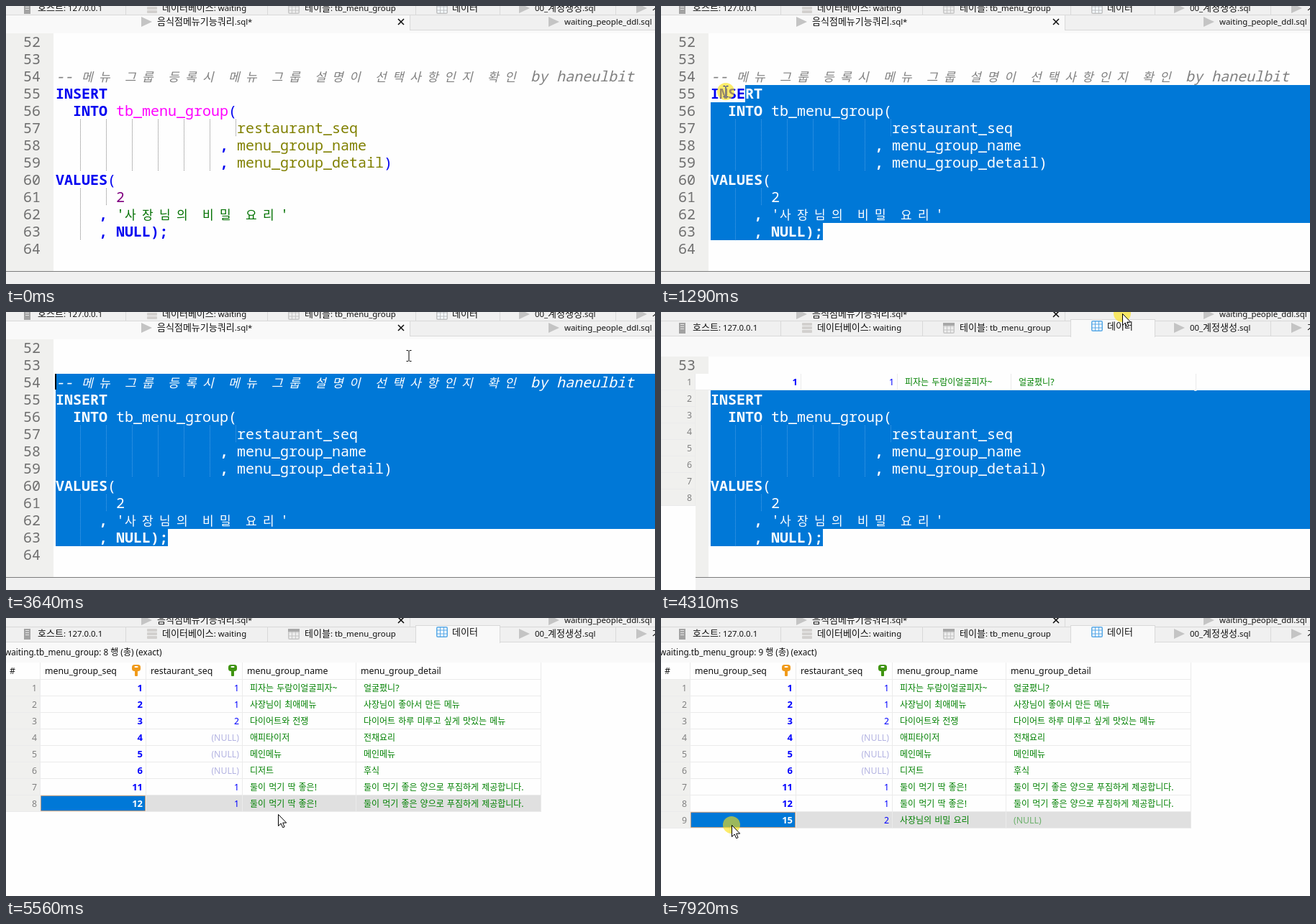
These frames come from a looping animation (902x387 px, 7990 ms). An HTML page:

```html
<!DOCTYPE html>
<html lang="ko">
<head>
<meta charset="utf-8">
<title>SQL editor</title>
<style>
  html, body { margin: 0; width: 100%; height: 100%; overflow: hidden; background: #f0f0f0; }
  svg { display: block; width: 902px; height: 387px; font-family: 'Noto Sans', 'Noto Sans CJK KR', 'Noto Sans CJK JP', sans-serif; }
  .ko { font-family: 'Noto Sans CJK KR', 'Noto Sans CJK JP', 'Noto Sans CJK', sans-serif; }
  .code { font: 20px 'Noto Sans Mono', 'DejaVu Sans Mono', monospace; }
  .code .ko { font-size: 17px; letter-spacing: 8.36px; }
  .tabs { font-size: 11.4px; }
  .tabs .ko { font-size: 13px; }
  .grid { font-size: 12.3px; }
  .grid .ko { font-size: 12px; }
  .grid .bold { font-size: 13px; }
  .cell { word-spacing: .9px; }
  .end { text-anchor: end; }
  .bold, .key, .sep { font-weight: 700; }
  .key, .sep, .sym { fill: #0000f0; }
  .table { fill: #f0f; }
  .field { fill: #808000; }
  .num { fill: #800080; }
  .str { fill: #007000; }
  .note { fill: #808080; font-style: italic; }
  .guide { stroke: #808080; stroke-dasharray: 1 1; }
  .sel text { fill: #fff; }
  .sel .guide { stroke: #4a9ee6; }
</style>
</head>
<body>
<svg id="stage" viewBox="0 0 902 387" xmlns="http://www.w3.org/2000/svg"></svg>
<script>
const DURATION = 7990, LEFT = 69, COL = 12, LINE = 24, ASCENT = 19;
const lineTop = n => 38 + LINE * (n - 52);

const rect = (x, y, w, h, fill, more = '') => `<rect x="${x}" y="${y}" width="${w}" height="${h}" fill="${fill}" ${more}/>`;
const hline = (x, y, w, c = '#d9d9d9') => rect(x, y, w, 1, c);
const vline = (x, y, h, c = '#d9d9d9') => rect(x, y, 1, h, c);
const hangul = s => s.replace(/[가-힣]+/g, m => `<tspan class="ko">${m}</tspan>`);
const text = (x, y, s, cls = '', fill = '#111') => `<text x="${x}" y="${y}" class="${cls}" fill="${fill}">${hangul(s)}</text>`;
const group = (id, cls, body) => `<g id="${id}" class="${cls}">${body}</g>`;

// Code editor: [line, column, style, text]
const CODE = [
  [54, 0, 'note', '-- 메뉴 그룹 등록시 메뉴 그룹 설명이 선택사항인지 확인 by haneulbit'],
  [55, 0, 'key', 'INSERT'],
  [56, 2, 'key', 'INTO'], [56, 7, 'table', 'tb_menu_group'], [56, 20, 'sym', '('],
  [57, 21, 'field', 'restaurant_seq'],
  [58, 19, 'sep', ','], [58, 21, 'field', 'menu_group_name'],
  [59, 19, 'sep', ','], [59, 21, 'field', 'menu_group_detail'], [59, 38, 'sym', ')'],
  [60, 0, 'key', 'VALUES'], [60, 6, 'sym', '('],
  [61, 7, 'num', '2'],
  [62, 5, 'sep', ','], [62, 7, 'str', "'사장님의 비밀 요리'"],
  [63, 5, 'sep', ','], [63, 7, 'key', 'NULL'], [63, 11, 'sep', ');']
];
const columns = s => [...s].reduce((n, c) => n + (/[가-힣]/.test(c) ? 2 : 1), 0);

function codeRun([line, col, cls, s]) {
  let out = '';
  for (const m of s.matchAll(/[가-힣]+|[^\s가-힣]+/g))
    out += text(LEFT + COL * (col + columns(s.slice(0, m.index))), lineTop(line) + ASCENT, m[0], cls, '');
  return out;
}
function guide(i, from, to) {
  const x = 67.5 + 36 * i;
  return `<path class="guide" d="M${x} ${lineTop(from)}V${lineTop(to + 1) - 1}"/>`;
}
const guides = [1, 2, 3, 4, 5, 6].map(i => guide(i, 57, 59)).join('')
  + guide(7, 57, 57) + guide(1, 61, 63) + guide(2, 61, 61);
const codeText = guides + CODE.map(codeRun).join('');

function editor() {
  let s = rect(0, 38, 902, 331, '#fefefe') + rect(0, 38, 66, 331, '#f0f0ee');
  for (let n = 52; n <= 64; n++) s += text(24, lineTop(n) + ASCENT, '' + n, '', '#707070');
  s += codeText + `<g class="sel" clip-path="url(#range)">${rect(0, 38, 902, 331, '#0078d7')}${codeText}</g>`;
  return s + rect(0, 369, 902, 18, '#f0f0f0') + hline(0, 369, 902, '#7c7c7c') + rect(68, 86, 2, 22, '#000', 'id="caret"');
}

// Tab rows
const play = x => `<path d="M${x} 15L${x + 15} 22L${x} 29Z" fill="#c4c4c4"/>`;
const server = rect(25, 15, 9, 15, '#a2a2a2') + [17, 20, 23].map(y => hline(27, y, 5, '#e4e4e4')).join('');
const database = [15, 20, 25].map(y => rect(196, y, 14, 4, '#d2d0ce', 'rx="1"')).join('');
const sheet = (x, y, c, bg) => rect(x + .75, y + .75, 14.5, 13.5, bg, `rx="1.5" stroke="${c}" stroke-width="1.5"`)
  + [5, 10].map(d => vline(x + d, y + 1, 13, c) + hline(x + 1, y + d - .5, 14, c)).join('');

function hostTabs(active) {
  let s = [166, 363, 569, 686, 847].map(x => vline(x, 13, 20)).join('') + server + database
    + sheet(392, 15, '#c6c6c6', '#eee') + rect(392, 15, 16, 4, '#a8a8a8')
    + text(44, 26, '호스트: 127.0.0.1') + text(217, 26, '데이터베이스: waiting')
    + text(415, 26, '테이블: tb_menu_group') + play(713) + text(735, 26, '00_계정생성.sql')
    + play(876) + text(898, 26, '가');
  if (active) s += rect(569.5, 10.5, 117, 24, '#f9f9f9', 'stroke="#d9d9d9"') + rect(570, 33, 116, 3, '#f9f9f9');
  return s + sheet(598, active ? 12 : 15, active ? '#5aa9e6' : '#c0c0c0', '#f4faff')
    + text(620, active ? 24 : 26, '데이터');
}
function fileTabs(active) {
  const tab = active ? rect(0, 13, 561, 22, '#f9f9f9') : '';
  return tab + vline(561, 13, 20) + play(188) + text(210, 26, '음식점메뉴기능쿼리.sql*')
    + '<path d="M545 18L553 26M553 18L545 26" stroke="#111" stroke-width="1.6"/>'
    + play(754) + text(776, 26, 'waiting_people_ddl.sql');
}
function tabRows(back, front) {
  return rect(0, 0, 902, 38, '#f0f0f0') + `<g transform="translate(0 -19)">${back}</g>`
    + rect(0, 12, 902, 21, '#f0f0f0') + hline(0, 12, 902)
    + rect(0, 33, 902, 5, '#f9f9f9') + hline(0, 33, 902) + front;
}

// Data grid
const PAIR = ['둘이 먹기 딱 좋은!', '둘이 먹기 좋은 양으로 푸짐하게 제공합니다.'];
const ROWS = [
  [1, 1, '피자는 두람이얼굴피자~', '얼굴폈니?'],
  [2, 1, '사장님이 최애메뉴', '사장님이 좋아서 만든 메뉴'],
  [3, 2, '다이어트와 전쟁', '다이어트 하루 미루고 싶게 맛있는 메뉴'],
  [4, null, '애피타이저', '전채요리'],
  [5, null, '메인메뉴', '메인메뉴'],
  [6, null, '디저트', '후식'],
  [11, 1, ...PAIR],
  [12, 1, ...PAIR],
  [15, 2, '사장님의 비밀 요리', null]
];
const HEAD = ['menu_group_seq', 'restaurant_seq', 'menu_group_name', 'menu_group_detail'];
const keyIcon = (x, c) => rect(x - 6, 65, 12, 9, c, 'rx="3.5"') + rect(x - 2, 73, 4, 8, c, 'rx="1"') + rect(x - 2.5, 67, 5, 2, '#fff', 'rx="1"');

function grid(count, w, selected) {
  const edges = [0, 147, 281, 439, 696].map(d => d + w), right = edges[4], bottom = 86 + 23 * count;
  let s = rect(0, 34, 902, 353, '#fefefe') + rect(0, 34, 902, 28, '#f9f9f9')
    + `<g class="status" font-size="11.75">${text(-2, 52, `waiting.tb_menu_group: ${count} 행 (총) (exact)`)}</g>`
    + rect(0, 86, w, bottom - 87, '#f0f0ee') + text(5, 78, '#');
  HEAD.forEach((h, i) => s += text(edges[i] + 7, 78, h));
  s += keyIcon(edges[1] - 13, '#f09a1a') + keyIcon(edges[2] - 13, '#3f9410');
  const top = 86 + 23 * (selected - 1);
  s += rect(edges[1], top, right - edges[1], 22, '#e0e0e0');
  for (let i = 0; i <= count; i++) s += hline(0, 85 + 23 * i, right, '#ebebeb');
  for (const x of edges) s += vline(x, 62, bottom - 62, '#ebebeb');
  s += rect(w + 1.5, top + .5, 145, 21, '#0078d7', 'stroke="#ff8728" stroke-dasharray="1 1"');
  ROWS.slice(0, count).forEach(([seq, shop, name, detail], i) => {
    const y = 102 + 23 * i;
    s += text(w - 4, y, '' + (i + 1), 'end', '#808080')
      + text(edges[1] - 4, y, '' + seq, 'end bold', i + 1 === selected ? '#fff' : '#00f')
      + text(edges[2] - 4, y, shop ? '' + shop : '(NULL)', 'end', shop ? '#00f' : '#b4b4e2')
      + text(edges[2] + 11, y, name, 'cell', '#008000')
      + text(edges[3] + 11, y, detail || '(NULL)', 'cell', detail ? '#008000' : '#6cb06c');
  });
  return s;
}

document.getElementById('stage').innerHTML =
  `<defs><clipPath id="range"><polygon id="rangeShape"/></clipPath>
   <clipPath id="partial"><path d="M0 0H902V62H0ZM0 86H902V109H48V387H0Z"/></clipPath></defs>`
  + group('editor', 'code', editor())
  + group('before', 'grid', grid(8, 47, 8))
  + group('after', 'grid', grid(9, 40, 8))
  + group('picked', 'grid', grid(9, 40, 9))
  + group('fileRow', 'tabs', tabRows(hostTabs(false), fileTabs(true)))
  + group('hostRow', 'tabs', tabRows(fileTabs(false), hostTabs(true)))
  + `<circle id="halo" r="12" fill="#fbe010" fill-opacity=".62"/>
     <path id="beam" d="M-3.5 -7.5H-1L0 -6.5L1 -7.5H3.5M0 -6.5V6.5M-3.5 7.5H-1L0 6.5L1 7.5H3.5" fill="none" stroke="#fff" style="mix-blend-mode:difference"/>
     <path id="arrow" d="M.5 .5V16.5L4.2 13L6.7 18.7L9.1 17.7L6.7 12.1H11.7Z" fill="#fff" stroke="#000"/>`;

const el = id => document.getElementById(id);
const show = (id, on) => el(id).style.display = on ? '' : 'none';

// Pointer: [start, end, steps, x, y]
const MOVES = [
  [130, 880, 11, 207, 228], [940, 1430, 8, 68, 99], [1690, 2100, 7, 435, 153],
  [3430, 3850, 7, 641, 2], [4380, 4840, 8, 359, 281], [4970, 5230, 5, 377, 273],
  [5500, 5560, 2, 378, 273], [6090, 6560, 8, 408, 306], [6830, 7460, 9, 100, 312],
  [7920, 7920, 1, 98, 288]
];
function pointer(t) {
  let x = 240, y = 360;
  for (const [from, to, steps, x1, y1] of MOVES) {
    if (t < from) break;
    const k = t >= to ? steps : 1 + Math.floor((t - from) / (to - from) * (steps - 1));
    const f = k / steps, e = f * f * (3 - 2 * f);
    x += (x1 - x) * e;
    y += (y1 - y) * e;
  }
  return [x, y];
}

// Selection start: [time, line, column]
const RANGE = [
  [430, 63, 11], [580, 62, 12], [730, 61, 8], [940, 60, 7], [1010, 59, 10], [1080, 58, 9],
  [1150, 57, 7], [1220, 56, 6], [1290, 55, 4], [1360, 54, 2], [1430, 54, 0]
];
function rangePoints(t) {
  const step = RANGE.filter(r => r[0] <= t).pop();
  if (!step) return '';
  const x = LEFT + COL * step[2], y = lineTop(step[1]);
  if (step[1] === 63) return `${x},${y} 225,${y} 225,326 ${x},326`;
  return `${x},${y} 902,${y} 902,302 225,302 225,326 ${LEFT},326 ${LEFT},${y + LINE} ${x},${y + LINE}`;
}

const within = (t, a, b) => t >= a && t < b;

function draw(t) {
  const [x, y] = pointer(t);
  const arrow = t >= 4310 || y < 38;
  show('editor', t < 4380);
  show('fileRow', t < 4310);
  show('hostRow', t >= 4310);
  show('before', within(t, 4310, 6090));
  show('after', within(t, 6090, 7920));
  show('picked', t >= 7920);
  show('caret', within(t, 1440, 4310) && Math.floor((t - 1440) / 530) % 2 === 0);
  show('halo', within(t, 205, 1690) || within(t, 4050, 4380) || t >= 7920);
  show('beam', t >= 130 && !arrow);
  show('arrow', arrow);
  for (const id of ['halo', 'beam', 'arrow'])
    el(id).setAttribute('transform', `translate(${Math.round(x)} ${Math.round(y)})`);
  el('rangeShape').setAttribute('points', rangePoints(t));

  // The grid paints in two passes when it opens.
  const partial = t < 4380;
  el('before').setAttribute('clip-path', partial ? 'url(#partial)' : 'none');
  el('before').querySelector('.status').style.display = partial ? 'none' : '';
}

const began = performance.now();
function tick() {
  draw((performance.now() - began) % DURATION);
  requestAnimationFrame(tick);
}
tick();
</script>
</body>
</html>
```
